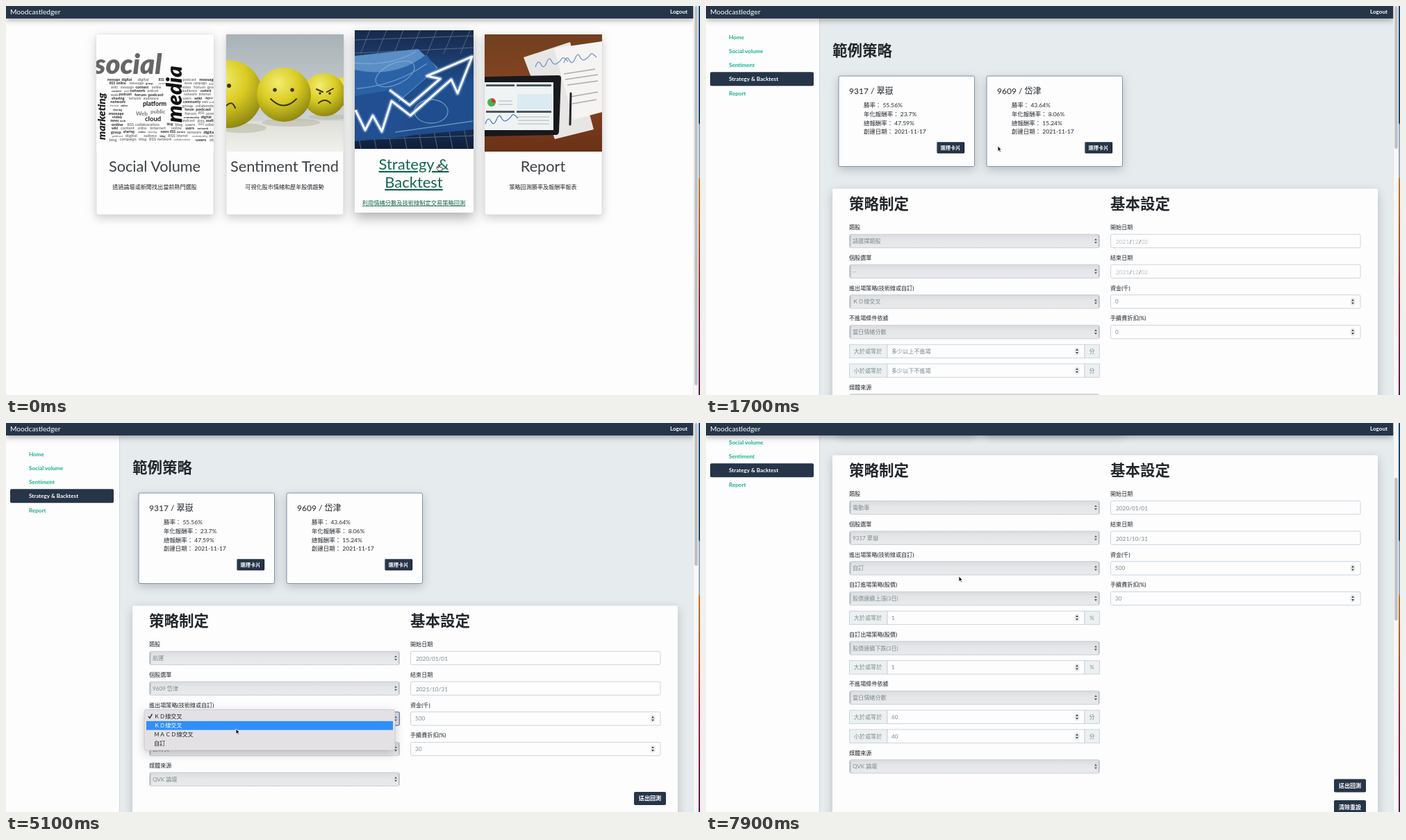
Recreate the animation shown at these times as an HTML page. Size 999 by 561 pixels, loop 8000 ms.

```html
<!DOCTYPE html>
<html lang="zh-Hant">
<head>
<meta charset="utf-8">
<title>Strategy demo</title>
<style>
html, body { margin: 0; width: 100%; height: 100%; overflow: hidden; background: #fdfdfd; }
svg { display: block; width: 999px; height: 561px; font-family: Lato, "Noto Sans CJK TC", "Noto Sans CJK", sans-serif; }
text { white-space: pre; }
.soft { filter: drop-shadow(0 4px 7px rgba(0,0,0,.2)); }
.deep { filter: drop-shadow(0 7px 9px rgba(0,0,0,.32)); }
</style>
</head>
<body>
<svg id="stage" viewBox="0 0 999 561"></svg>
<script>
const LOOP = 8000, NAVY = '#263548', INK = '#22272c', GREY = '#7b8a8b', GREEN = '#12664d';
const BRAND = 'Moodcastledger', FORUM = 'QVK 論壇';
const STOCKS = ['9317 / 翠嶽', '9609 / 岱津'];

// y is the vertical middle of the line
const text = (x, y, size, str, fill = INK, more = '') =>
  `<text x="${x}" y="${y + size * .36}" font-size="${size}" fill="${fill}" ${more}>${str}</text>`;
const rect = (x, y, w, h, fill, more = '') =>
  `<rect x="${x}" y="${y}" width="${w}" height="${h}" fill="${fill}" ${more}/>`;
const path = (d, fill, more = '') => `<path d="${d}" fill="${fill}" ${more}/>`;
const ball = (x, y, r, fill = 'url(#ball)') => `<circle cx="${x}" cy="${y}" r="${r}" fill="${fill}"/>`;
const group = (id, body, more = '') => `<g id="${id}" ${more}>${body}</g>`;
const MID = 'text-anchor="middle"', BOLD = 'font-weight="700"';

let seed = 7;
const random = () => (seed = seed * 16807 % 2147483647) / 2147483647;

/* ---------- home page ---------- */
function wordCloud() {
  const words = 'blog web forum video network content online sharing news collaboration wiki internet campaign users podcast digital community RSS group message audience'.split(' ');
  let out = rect(130, 41, 169, 169, '#fdfdfd');
  for (let y = 106; y < 193; y += 5.4) {
    for (let x = 146 + random() * 8; x < 294;) {
      const word = words[Math.floor(random() * words.length)], size = 4 + random() * 2.5;
      const width = word.length * size * .56;
      const blocked = (y < 168 && x + width > 231 && x < 253) || (y > 134 && y < 169 && x + width > 185 && x < 231);
      if (!blocked) out += text(x, y, size, word, random() < .5 ? '#222' : '#777', BOLD);
      x += blocked ? 5 : width + 2;
    }
  }
  const big = 'font-weight="900" font-style="italic"';
  out += text(127, 84, 40, 'social', '#666', big);
  out += text(0, 0, 31, 'media', '#111', big + ' transform="translate(242 168) rotate(-90)"');
  out += text(0, 0, 15.5, 'marketing', '#222', big + ' transform="translate(137 193) rotate(-90)"');
  [['platform', 197, 141, 9, '#111'], ['Web', 187, 155, 8, '#777'], ['public', 208, 152, 8, '#777'], ['cloud', 200, 163, 9.5, '#222']]
    .forEach(([word, x, y, size, fill]) => out += text(x, y, size, word, fill, BOLD));
  return out;
}

function balls() {
  const line = 'stroke="#3a3510" stroke-width="2" stroke-linecap="round"';
  return rect(317, 41, 169, 169, 'url(#wall)') + rect(317, 166, 169, 44, 'url(#floor)')
    + '<g fill="#b9b8a2" opacity=".55"><ellipse cx="410" cy="168" rx="42" ry="6"/><ellipse cx="340" cy="176" rx="35" ry="7"/><ellipse cx="465" cy="160" rx="30" ry="4"/></g>'
    + ball(487, 123, 21) + ball(458, 128, 31) + ball(320, 127, 49) + ball(400, 128, 39)
    + ball(387, 121, 2.7, '#3a3510') + ball(412, 121, 2.7, '#3a3510')
    + path('M381 134Q400 153 418 134', 'none', line)
    + path('M447 120l9 4M471 119l-9 5M450 140q9-8 17 0M317 144q8-9 13 3', 'none', line)
    + ball(452, 126, 1.8, '#3a3510') + ball(466, 126, 1.8, '#3a3510') + ball(321, 115, 3, '#3a3510');
}

function money() {
  let out = rect(502, 35, 171, 171, 'url(#night)');
  let tiles = '';
  for (let i = 0; i < 10; i++) tiles += `M${500 + i * 24} 35l-14 34M${505 + i * 22} 175l6 31`;
  out += path(tiles + 'M502 49L673 43M502 68L673 60M502 193L673 187', 'none', 'stroke="#58677f" stroke-width="1"');
  out += path('M502 72L593 62L622 89L552 150L502 140Z', '#5b8ec4') + path('M502 92Q560 105 605 70L620 90L540 158L502 145Z', '#2b61a5');
  out += path('M545 145L673 105V178L550 190Z', '#1f4d8d') + path('M502 130L560 120L580 188L502 195Z', '#214f91');
  out += '<g fill="none" stroke="#8db6de" stroke-width="1.4" opacity=".65"><ellipse cx="560" cy="98" rx="30" ry="15" transform="rotate(-25 560 98)"/><ellipse cx="612" cy="152" rx="24" ry="17"/><path d="M502 82Q550 88 590 66M560 182L672 166M505 119Q560 115 606 83"/></g>';
  const arrow = 'M503 150L517 179L528 158L541 181L555 137L582 158L641 106L650 126L671 73L606 101L625 105L581 143L552 121';
  out += path(arrow, 'none', 'stroke="#9cc5ff" stroke-width="7" opacity=".4" stroke-linejoin="round"');
  return out + path(arrow, 'none', 'stroke="#fff" stroke-width="3" stroke-linejoin="round"');
}

function desk() {
  const chart = 'q4 -12 8 -4t8 -2 7 -3 8 4 7 -7 9 4';
  let out = rect(689, 41, 169, 169, 'url(#wood)');
  out += path('M745 74L812 52L846 178L790 192Z', '#e8e6e5') + path('M789 61L858 51V153L817 164Z', '#f5f4f3');
  out += path(`M762 88${chart}M803 82${chart}`, 'none', 'stroke="#6b8fbd" stroke-width="1.2"');
  out += path('M803 98l45-7M805 106l47-7M808 114l44-6M812 131l40-7M815 141l35-6', 'none', 'stroke="#aaa" stroke-width="1.5"');
  out += path('M686 102L795 100Q799 100 799 104L796 181Q796 186 791 186L686 188Z', '#17191c') + rect(689, 110, 99, 69, '#f0f3f3');
  [[691, 113], [735, 113], [691, 151], [735, 151]].forEach(([x, y]) => out += rect(x, y, x < 700 ? 41 : 50, 3, '#4c555e'));
  out += rect(736, 127, 51, 22, '#dcebf1') + ball(699, 139, 6, '#4caf50') + path('M699 139V133A6 6 0 0 1 705 139Z', '#d33');
  out += path(`M690 170${chart}`, 'none', 'stroke="#4179b5" stroke-width="1.2"');
  out += path('M737 160h45M737 165h45M737 170h45M709 137h20M709 142h20', 'none', 'stroke="#a7b3ba"');
  return out + path('M813 126L812 171', 'none', 'stroke="#23252a" stroke-width="3" stroke-linecap="round"');
}

function homeCard(x, picture, title, note) {
  const edge = 'stroke="#d5d7d9" stroke-width=".8" rx="2"';
  return rect(x, 41, 169, 260, '#fdfdfd', edge + ' class="soft"') + picture
    + text(x + 84, 231.5, 21.7, title, '#3c4044', MID) + text(x + 84, 261, 8.1, note, INK, MID);
}

function home() {
  const link = MID + ' text-decoration="underline"';
  return rect(0, 0, 999, 561, '#fdfdfd')
    + homeCard(130, `<g clip-path="url(#c1)">${wordCloud()}</g>`, 'Social Volume', '透過論壇或新聞找出當前熱門選股')
    + homeCard(317, `<g clip-path="url(#c2)">${balls()}</g>`, 'Sentiment Trend', '可視化股市情緒和歷年股價趨勢')
    + homeCard(689, `<g clip-path="url(#c4)">${desk()}</g>`, 'Report', '策略回測勝率及報酬率報表')
    + rect(502, 35, 171, 263, '#fdfdfd', 'rx="2" class="deep"') + `<g clip-path="url(#c3)">${money()}</g>`
    + text(587, 228, 22, 'Strategy &amp;', GREEN, link) + text(587, 254, 22, 'Backtest', GREEN, link)
    + text(587, 284, 8.25, '利用情緒分數及技術線制定交易策略回測', GREEN, link);
}

/* ---------- strategy page ---------- */
function stockCard(i, rows) {
  const x = 191 + i * 213;
  const labels = ['勝率', '年化報酬率', '總報酬率', '創建日期'];
  return group('card' + i,
    rect(x, 101, 195.5, 130.5, '#fdfdfd', 'rx="2" stroke="#7385a5" stroke-width=".9" class="soft"')
    + text(x + 15, 123, 12, STOCKS[i])
    + labels.map((label, n) => text(x + 36, 143 + n * 12.75, 8.45, `${label}： ${rows[n]}`)).join('')
    + rect(x + 142, 196.5, 38.5, 15.5, NAVY, 'stroke="#101b2b" stroke-width="1.2" rx="1"')
    + path(`M${x + 142} 212V196.5H${x + 180}`, 'none', 'stroke="#63758c" stroke-width=".8"')
    + text(x + 161, 204, 7.3, '選擇卡片', '#fff', MID + BOLD.padStart(20)));
}

const carets = (x, y, color) => path(`M${x - 2} ${y - 1}l2-2.8l2 2.8zM${x - 2} ${y + 1}l2 2.8l2-2.8z`, color);
const spinner = (x, y) => rect(x - 3, y - 5, 6, 10, '#f3f4f4', 'rx="2.5" stroke="#d3d7d9" stroke-width=".6"') + carets(x, y, '#444');
const BORDER = 'stroke="#c5d0dd" stroke-width=".9"';
const label = (x, y, str) => text(x, y, 8.1, str, INK, 'font-weight="500"');
const select = (y, value) => rect(206.5, y - 9.7, 360, 19.4, 'url(#select)', 'rx="2.5" stroke="#c3cad2" stroke-width=".9"')
  + rect(207, y - 8.5, 1.6, 17, '#b9bec5', 'rx=".8"') + rect(564.6, y - 8.5, 1.6, 17, '#c3c7cc', 'rx=".8"')
  + text(211, y, 8.1, value, GREY) + carets(561, y, '#59636b');
const box = (x, y, w, fill) => rect(x, y - 9.7, w, 19.4, fill, BORDER);
const bound = (y, name, value, unit) => box(206.5, y, 54.5, '#ecf0f1') + box(261, y, 284, '#fdfdfd') + box(545, y, 21.5, '#ecf0f1')
  + text(233, y, 8.1, name, GREY, MID) + text(267, y, 8.1, value, GREY) + text(555.5, y, 8.1, unit, GREY, MID) + spinner(534, y);
const button = (y, str) => rect(904, y - 9.5, 46, 19, NAVY, 'rx="2"') + text(927, y, 8.1, str, '#fff', MID + ' ' + BOLD);

// rows: [label, value, ...bounds], each bound being [name, value, unit]
function form(id, rows, dates, numbers) {
  let out = '', y = 319.3;
  for (const [name, value, ...bounds] of rows) {
    out += label(206, y, name) + select(y += 19.7, value);
    for (const b of bounds) out += bound(y += 27.8, ...b);
    y += 24;
  }
  out += button(y + 3.6, '送出回測') + button(y + 34.2, '清除重設');
  ['開始日期', '結束日期', '資金(千)', '手續費折扣(%)'].forEach((name, i) => {
    const top = 319.3 + i * 43.7, mid = top + 19.7;
    out += label(582, top, name) + rect(582.5, mid - 9.7, 359.5, 19.4, '#fdfdfd', 'rx="2" ' + BORDER);
    out += i > 1 ? text(589, mid, 8.1, numbers[i - 2], GREY) + spinner(931, mid)
      : text(590, mid + 1, 8.3, dates ? dates[i] : '2021<tspan fill="#444">/</tspan>12<tspan fill="#444">/</tspan>02', dates ? GREY : '#bcc2c5');
  });
  return group(id, out);
}

const MORE = '大於或等於', LESS = '小於或等於';
const rowsFor = (kind, stock, method, extra, stop) => [
  ['類股', kind], ['個股選單', stock], ['進出場策略(技術線或自訂)', method], ...extra,
  ['不進場條件依據', ...stop], ['媒體來源', FORUM]];
const range = [2020, 2021].map((year, i) => year + (i ? '/10/31' : '/01/01'));
const shipping = method => rowsFor('航運', STOCKS[1].replace(' /', ''), method, [], ['正轉負']);

function strategy() {
  const forms = [
    rowsFor('請選擇類股', '--', 'ＫＤ線交叉', [], ['當日情緒分數', [MORE, '多少以上不進場', '分'], [LESS, '多少以下不進場', '分']]),
    shipping('ＫＤ線交叉'),
    shipping('ＭＡＣＤ線交叉'),
    rowsFor('電動車', STOCKS[0].replace(' /', ''), '自訂', [
      ['自訂進場策略(股價)', '股價連續上漲(3日)', [MORE, '1', '%']],
      ['自訂出場策略(股價)', '股價連續下跌(3日)', [MORE, '1', '%']]],
      ['當日情緒分數', [MORE, '60', '分'], [LESS, '40', '分']])];
  const content = text(182, 64, 21.5, '範例策略', INK, BOLD)
    + stockCard(0, ['55.56%', '23.7%', '47.59%', '2021-11-17'])
    + stockCard(1, ['43.64%', '8.06%', '15.24%', '2021-11-17'])
    + rect(182, 263.5, 785, 700, '#fdfdfd', 'rx="2" class="soft"')
    + text(206, 285.5, 21.5, '策略制定', INK, BOLD) + text(582, 285.5, 21.5, '基本設定', INK, BOLD)
    + forms.map((rows, i) => form('form' + i, rows, i && range, i ? [500, 30] : [0, 0])).join('')
    + group('focus', rect(206.5, 416.7, 360, 19.4, 'none', 'rx="2.5" stroke="#5d7fae" stroke-width="1.1"'));
  const links = ['Home', 'Social volume', 'Sentiment', 'Strategy &amp; Backtest', 'Report'];
  const side = rect(6, 95.3, 149, 20, NAVY, 'rx="2"')
    + links.map((name, i) => text(33, 45.2 + i * 20.1, 8.1, name, i == 3 ? '#fff' : '#13b08f', BOLD)).join('');
  const menu = rect(199, 413.5, 361, 58.5, '#e4e1e5', 'rx="3" class="soft" stroke="#bbb" stroke-width=".6"')
    + rect(202, 430, 355, 12.8, '#2f8ff8', 'id="highlight"')
    + ['ＫＤ線交叉', 'ＫＤ線交叉', 'ＭＡＣＤ線交叉', '自訂'].map((name, i) => text(213, 422.6 + i * 13.3, 8.1, name, '#222', 'class="option"')).join('')
    + path('M205 423l2 2.6l3.4-6', 'none', 'stroke="#222" stroke-width="1.3"');
  return rect(163, 0, 827, 561, '#e6ebee') + group('content', content)
    + rect(0, 0, 163, 561, '#fdfdfd') + rect(163, 0, .8, 561, '#cdd4d9') + group('side', side) + group('menu', menu);
}

/* ---------- assembly ---------- */
const gradient = (id, stops, more = 'x2="0" y2="1"') => `<linearGradient id="${id}" ${more}>${stops.map(([at, c]) => `<stop offset="${at}" stop-color="${c}"/>`).join('')}</linearGradient>`;
const clip = (id, x, y, s) => `<clipPath id="${id}">${rect(x, y, s, s, '#000')}</clipPath>`;

const stage = document.getElementById('stage');
stage.innerHTML = '<defs>'
  + gradient('wall', [[0, '#a9b2b6'], [.75, '#cfd5d8']]) + gradient('floor', [[0, '#dedfd8'], [1, '#f1f1ec']])
  + gradient('night', [[0, '#17294b'], [.5, '#20508f'], [1, '#101e38']]) + gradient('wood', [[0, '#71401f'], [.5, '#884522'], [1, '#693116']])
  + gradient('select', [[0, '#d9dbdf'], [.4, '#e5e6e8'], [1, '#e9eaec']])
  + gradient('desktop', [[0, '#0d4a78'], [.3, '#0d4a78'], [.305, '#93a9c4'], [.44, '#93a9c4'], [.445, '#c47a1e'], [.6, '#c14f26'], [.75, '#a32045'], [1, '#641a52']])
  + '<radialGradient id="ball" cx=".4" cy=".28" r=".75"><stop offset="0" stop-color="#f3ec70"/><stop offset=".5" stop-color="#d9cb22"/><stop offset="1" stop-color="#8c8410"/></radialGradient>'
  + clip('c1', 130, 41, 169) + clip('c2', 317, 41, 169) + clip('c3', 502, 35, 171) + clip('c4', 689, 41, 169)
  + '</defs>' + rect(0, 0, 999, 561, '#fdfdfd')
  + group('home', home()) + group('strategy', strategy())
  + group('chrome', rect(0, 0, 990, 18, NAVY, 'style="filter:drop-shadow(0 2px 5px rgba(0,0,0,.35))"')
    + text(6, 8.3, 10.2, BRAND, '#fff') + text(956, 8.3, 8.1, 'Logout', '#fff', BOLD)
    + rect(989.5, 0, 7.5, 561, '#f8f8f8') + rect(989.5, 0, .6, 561, '#dedede')
    + rect(991.2, 0, 4.6, 547, '#bfc0c1', 'rx="2.3" id="thumb"'))
  + rect(997, 0, 2, 561, 'url(#desktop)')
  + group('arrow', path('M0 0V7.6L1.8 6L3 8.7L4.3 8.1L3.1 5.5H5.4Z', '#111', 'stroke="#fff" stroke-width=".7"'))
  + group('hand', path('M-.8 0Q0-1 .8 0V3.2L4.6 4Q5.4 4.3 5.2 5.5L4.4 8.8H-.2L-3.2 5.3Q-3-.1 -.8 5Z', '#fff', 'stroke="#111" stroke-width=".8" stroke-linejoin="round"'));

const $ = id => document.getElementById(id);
const options = document.querySelectorAll('.option');
const show = (id, on) => $(id).style.display = on ? '' : 'none';
const move = (id, x, y) => $(id).setAttribute('transform', `translate(${x} ${y})`);
const ease = (t, from, to) => {
  const k = Math.min(1, Math.max(0, (t - from) / (to - from)));
  return k * k * (3 - 2 * k);
};
const between = (t, from, to) => t >= from && t < to;

const PATH = [[0, 623, 229], [600, 622, 230], [900, 622, 230], [1700, 420, 202], [2150, 562, 204], [2550, 562, 204],
  [3000, 427, 191], [3300, 420, 205], [4200, 335, 424], [4700, 335, 424], [5100, 331, 441], [5350, 331, 449],
  [5550, 331, 449], [6300, 364, 204], [6800, 364, 204], [7100, 364, 221], [LOOP, 364, 221]];

function pointer(t) {
  const i = PATH.findIndex(p => p[0] > t), [t0, x0, y0] = PATH[i - 1], [t1, x1, y1] = PATH[i];
  const k = ease(t, t0, t1);
  return [x0 + (x1 - x0) * k, y0 + (y1 - y0) * k];
}

function lift(i, k) {
  const cx = 289 + i * 213, cy = 166, s = 1 + .015 * k, card = $('card' + i);
  card.setAttribute('transform', `translate(${cx} ${cy - 4 * k}) scale(${s}) translate(${-cx} ${-cy})`);
  card.firstChild.setAttribute('class', k > .5 ? 'deep' : 'soft');
}

function draw(now) {
  const t = now % LOOP, [x, y] = pointer(t);
  const onHome = t < 400, onStrategy = t >= 800;
  show('home', onHome);
  show('strategy', onStrategy);
  show('chrome', onHome || onStrategy);

  const scroll = 217 * ease(t, 7000, 7800);
  move('content', 0, -scroll);
  move('side', 0, -Math.min(37, scroll));
  $('thumb').setAttribute('y', scroll * 79 / 217);
  $('thumb').setAttribute('height', onHome ? 547 : 206);

  const current = t < 2500 ? 0 : t < 5500 ? 1 : t < 6700 ? 2 : 3;
  for (let i = 0; i < 4; i++) show('form' + i, i == current);
  show('focus', between(t, 4400, 6700));
  lift(0, ease(t, 6150, 6400) - ease(t, 7100, 7300));
  lift(1, ease(t, 1720, 1950) - ease(t, 3400, 3600));

  show('menu', between(t, 4400, 5500));
  const picked = Math.min(3, Math.max(0, Math.floor((y - 416) / 13.3)));
  $('highlight').setAttribute('y', 416.6 + picked * 13.3);
  options.forEach((option, i) => option.setAttribute('fill', i == picked ? '#fff' : '#222'));

  const pointing = onHome || between(t, 2100, 2600) || between(t, 6250, 6900);
  show('hand', pointing);
  show('arrow', !pointing);
  move(pointing ? 'hand' : 'arrow', x, y);
}

function frame(now) {
  draw(now);
  requestAnimationFrame(frame);
}
requestAnimationFrame(frame);
</script>
</body>
</html>
```
